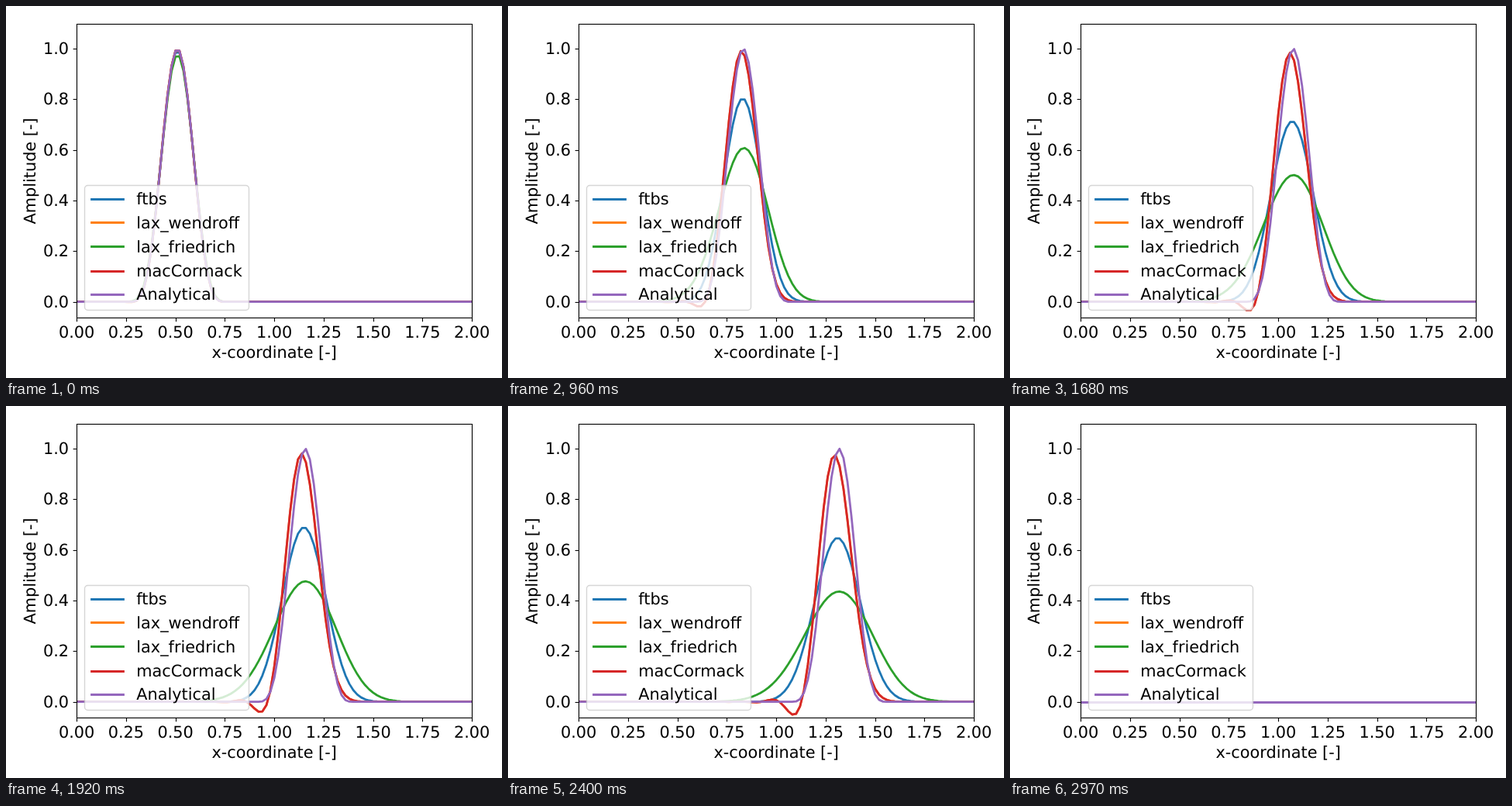
An HTML page that plays this animation: 640x480 px, repeating every 3 s.

```html
<!DOCTYPE html>
<html lang="en">
<head>
<meta charset="utf-8">
<title>Advection schemes</title>
<style>
  html, body { margin: 0; width: 100%; height: 100%; overflow: hidden; background: #fff; }
  svg { display: block; width: 640px; height: 480px; }
  text { font: 20.833px "DejaVu Sans", sans-serif; text-rendering: geometricPrecision; }
  .mid { text-anchor: middle; }
  .end { text-anchor: end; }
  .line { fill: none; stroke-width: 2.778; stroke-linejoin: round; stroke-linecap: square; }
  .axis { fill: none; stroke: #000; stroke-width: 1.111; }
</style>
</head>
<body>
<svg viewBox="0 0 640 480">
  <clipPath id="area"><rect x="91" y="23" width="510" height="379"/></clipPath>
  <g id="curves" clip-path="url(#area)"></g>
  <g id="axes">
    <rect class="axis" x="91.5" y="23.5" width="510" height="379"/>
    <text class="mid" x="346.2" y="454">x-coordinate [-]</text>
    <text class="mid" transform="translate(38 213) rotate(-90)">Amplitude [-]</text>
  </g>
  <g id="legend">
    <rect x="101.5" y="231.5" width="212" height="161" rx="4.2"
          fill="#fff" stroke="#ccc" stroke-width="1.389" opacity="0.8"/>
  </g>
</svg>
<script>
const STEP_MS = 30, FRAMES = 100;
const NODES = 101, DX = 0.02, CFL = 0.5, TIME_STEP = 1 / 99;

const toX = x => 91.2 + 255 * x;
const toY = u => 381.7 - 326.6 * u;
const snap = v => Math.round(v) + 0.5;

function add(parent, tag, attrs, label) {
  const el = document.createElementNS("http://www.w3.org/2000/svg", tag);
  for (const key in attrs) el.setAttribute(key, attrs[key]);
  if (label) el.textContent = label;
  return document.getElementById(parent).appendChild(el);
}

// Smooth pulse around 0.5, non-zero for 0.25 < x < 0.75
const pulse = x => Math.abs(x - 0.5) < 0.25 ? Math.cos(2 * Math.PI * x) ** 4 : 0;
const sample = shift => Array.from({ length: NODES }, (_, i) => pulse(i * DX - shift));

// Each scheme gives the new value from the left, own and right node
const upwind = (l, c) => c - CFL * (c - l);
const laxWendroff = (l, c, r) => c - CFL / 2 * (r - l) + CFL * CFL / 2 * (r - 2 * c + l);
const laxFriedrich = (l, c, r) => (l + r) / 2 - CFL / 2 * (r - l);
const macCormack = (l, c, r) => {
  const here = c - CFL * (r - c), left = l - CFL * (c - l);
  return (c + here - CFL * (here - left)) / 2;
};

function solve(scheme) {
  const states = [];
  let u = sample(0);
  for (let n = 0; n < FRAMES - 1; n++) {
    u = u.map((c, i) => i && i < NODES - 1 ? scheme(u[i - 1], c, u[i + 1]) : c);
    states.push(u);
  }
  return states;
}

const exact = Array.from({ length: FRAMES - 1 }, (_, n) => sample((n + 1) * TIME_STEP));

const series = [
  ["ftbs", "#1f77b4", solve(upwind), 249],
  ["lax_wendroff", "#ff7f0e", solve(laxWendroff), 279],
  ["lax_friedrich", "#2ca02c", solve(laxFriedrich), 310],
  ["macCormack", "#d62728", solve(macCormack), 342],
  ["Analytical", "#9467bd", exact, 372]
].map(([name, stroke, states, y]) => {
  add("legend", "path", { class: "line", stroke, d: `M110.5 ${snap(y)}H151.5` });
  add("legend", "text", { x: 168.3, y: y + (name.includes("_") ? 7.5 : 6.5) }, name);
  return { states, path: add("curves", "path", { class: "line", stroke }) };
});

for (let i = 0; i <= 8; i++) {
  const x = toX(i / 4);
  add("axes", "path", { class: "axis", d: `M${snap(x)} 402.5v4.86` });
  add("axes", "text", { class: "mid", x, y: 428 }, (i / 4).toFixed(2));
}
for (let i = 0; i <= 5; i++) {
  const y = snap(toY(i / 5));
  add("axes", "path", { class: "axis", d: `M91.5 ${y}h-4.86` });
  add("axes", "text", { class: "end", x: 81, y: y + 6.5 }, (i / 5).toFixed(1));
}

// The last frame of the loop is blank: a flat line on whole pixels
const trace = u => u
  ? "M" + u.map((v, i) => `${toX(i * DX).toFixed(2)} ${toY(v).toFixed(2)}`).join("L")
  : `M91 ${snap(toY(0))}H601`;

const start = performance.now();
let shown = -1;
function draw() {
  const frame = Math.floor((performance.now() - start) / STEP_MS) % FRAMES;
  if (frame !== shown) {
    for (const { states, path } of series) path.setAttribute("d", trace(states[frame]));
    shown = frame;
  }
  requestAnimationFrame(draw);
}
draw();
</script>
</body>
</html>
```
